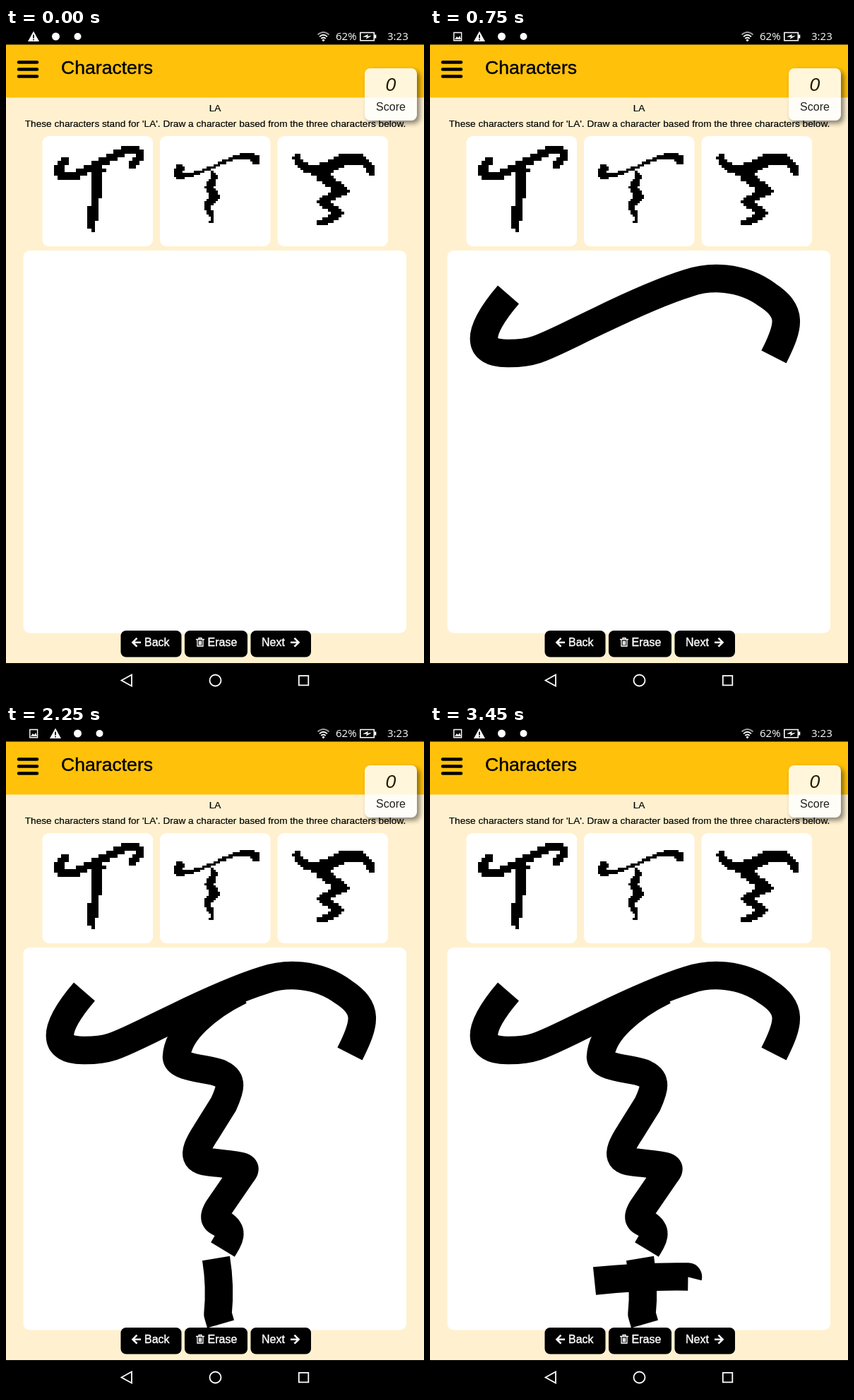
These frames come from a looping animation (592 px wide and 947 px high, 3.75 s). An HTML page:

```html
<!DOCTYPE html>
<html lang="en">
<head>
<meta charset="utf-8">
<title>Characters</title>
<style>
html, body { margin: 0; width: 100%; height: 100%; overflow: hidden; background: #fff1cf; }
svg { position: absolute; left: 0; top: 0; }
text { font: 13.67px "Liberation Sans", Arial, sans-serif; stroke: #000; stroke-width: .2; }
.title { font-size: 26.6px; stroke-width: .4; }
.status text { font: 15px "Open Sans", sans-serif; fill: #fff; stroke: none; }
.btn text { font-size: 16px; fill: #fff; stroke: #fff; stroke-width: .4; }
.mid { text-anchor: middle; }

.score {
  position: absolute; left: 508px; top: 57px; width: 74px; height: 74px;
  border-radius: 8px; background: #fff; opacity: .86;
  box-shadow: 4px 4px 7px rgba(0, 0, 0, .55);
  font: 16px/1 "Liberation Sans", Arial, sans-serif; text-align: center;
}
.score b { display: block; margin: 10px 0; font-size: 26.6px; font-weight: 400; font-style: italic; }

.brush { fill: none; stroke: #000; stroke-width: 39.5; stroke-linejoin: round; }
.step { animation: 3750ms step-end infinite; }
.s1 { animation-name: at1; }
.s2 { animation-name: at2; }
.s3 { animation-name: at3; }
.s4 { animation-name: at4; }
.notes { animation-name: shift; }
@keyframes at1 { 0% { opacity: 0 } 20%, 100% { opacity: 1 } }
@keyframes at2 { 0% { opacity: 0 } 40%, 100% { opacity: 1 } }
@keyframes at3 { 0% { opacity: 0 } 60%, 100% { opacity: 1 } }
@keyframes at4 { 0% { opacity: 0 } 80%, 100% { opacity: 1 } }
@keyframes shift { 0% { transform: none } 20%, 100% { transform: translateX(31px) } }
</style>
</head>
<body>
<svg width="592" height="947" viewBox="0 0 592 947">
  <rect width="592" height="947" fill="#fff1cf"/>
  <rect y="23" width="592" height="75.5" fill="#ffc10a"/>
  <rect width="592" height="23.5"/>

  <g class="status">
    <g class="step s1">
      <path d="M33.8 6.500h10.800v11.200h-10.800z" fill="none" stroke="#fff" stroke-width="1.4"/>
      <path d="M35 16l3-4 2 2 2-3 2 5z" fill="#fff"/>
    </g>
    <g class="step notes" fill="#fff">
      <path d="M39 4.5L47 19H31z"/>
      <path d="M39 9.5v5M39 15.8v1.8" stroke="#000" stroke-width="1.7"/>
      <circle cx="70.5" cy="12" r="5.5"/>
      <circle cx="101.5" cy="12" r="5"/>
    </g>
    <g fill="none" stroke="#fff" stroke-width="1.8">
      <path d="M441.5 9.5q8-7 16 0" stroke="#999"/>
      <path d="M444 12.3q5.5-5 11 0M446.3 15q3.200-3 6.400 0"/>
    </g>
    <circle cx="449.5" cy="17.3" r="1.6" fill="#fff"/>
    <text x="467" y="17">62%</text>
    <path d="M501.8 6.5h19.500v11.200h-19.500z" fill="none" stroke="#fff" stroke-width="1.6"/>
    <path d="M522 9.5h2.300v5h-2.300zM505 12.800l8-4-1 3 6-1-8 5 1-3z" fill="#fff"/>
    <text x="540" y="17">3:23</text>
  </g>

  <path d="M18 48.500h26m-26 10h26m-26 10h26" stroke="#000" stroke-width="4.6" stroke-linecap="round"/>
  <text class="title" x="78" y="65">Characters</text>
  <text class="mid" x="296" y="118">LA</text>
  <text class="mid" x="296.5" y="139.5">These characters stand for 'LA'. Draw a character based from the three characters below.</text>

  <g fill="#fff">
    <rect id="card" x="51.5" y="153" width="156.500" height="156" rx="9"/>
    <use href="#card" x="166.5"/>
    <use href="#card" x="333"/>
    <rect x="24.5" y="315" width="542.500" height="541.500" rx="9"/>
  </g>
  <path id="samples" shape-rendering="crispEdges"/>

  <g class="brush">
    <path class="step s1" d="M111 377.500C64 432 66 461 110 460.500C150 461 158 453 240 414C300 385 340 369 366 361C395 351 440 350 478 378C513 401 510 420 487 465.500"/>
    <path class="step s2" d="M332 376C285 399 243 435 241.500 470C243 487 290 486 304 493.500C322 502 318 515 308 537L283 577C260 612 270 617 290 619C342 625 343 624 333 637L300 685C290 702 300 702 309 708C322 718 317 726 307 742.500"/>
    <path class="step s3" d="M297.500 755Q304 795 300 834L304 848"/>
    <path class="step s4" d="M233 787Q300 780 365.500 781l-.1.4"/>
  </g>

  <g class="btn">
    <rect x="162.500" y="853" width="86" height="37.500" rx="7.500"/>
    <rect x="253" y="853" width="89" height="37.500" rx="7.500"/>
    <rect x="346.500" y="853" width="85.500" height="37.500" rx="7.500"/>
    <g fill="none" stroke="#fff">
      <path d="M191 869.700h-11m5.500-6l-6 6 6 6M403 869.700h11m-5.500-6l6 6-6 6" stroke-width="2.600"/>
      <path d="M269 865.500h12m-8 0v-2h4v2m-6 0v9.500h8v-9.500m-5.500 2v6m1.500 0v-6m1.500 0v6" stroke-width="1.300"/>
    </g>
    <text x="196" y="875">Back</text>
    <text x="285.500" y="875">Erase</text>
    <text x="362" y="875">Next</text>
  </g>

  <rect y="899" width="592" height="48"/>
  <g fill="none" stroke="#fff" stroke-width="1.800">
    <path d="M163.500 923.500l14.500-8v16z"/>
    <circle cx="296.500" cy="923.500" r="8"/>
    <path d="M414.800 916.800h13.500v13.500h-13.500z"/>
  </g>
</svg>
<div class="score"><b>0</b>Score</div>

<script>
// Each pen gives the radius at t = 0..1 along its stroke.
const samples = [
  { x: 67.5, y: 167, cell: 5.3, strokes: [
    ['M84 188C62 212 78 210 92 209S150 180 172 173Q190 168 188 182L179 192', t => 6],
    ['M131 202Q125 240 122 286', t => 8.5 - 4.5 * t * t]
  ] },
  { x: 231.5, y: 177, cell: 3.1, strokes: [
    ['M246 199Q236 211 252 209C285 205 305 186 335 182Q348 180 354 187', t => 2 + 4.5 * (1 - 2 * t) ** 2],
    ['M291 203L296 211 288 225 296 238 285 251 293 270M290 274h1', t => 2 + 4 * Math.sin(Math.PI * t)]
  ] },
  { x: 405, y: 178, cell: 3.9, strokes: [
    ['M411 183Q420 200 440 201C460 200 472 184 495 184Q510 185 519 206', t => 5 + 4 * Math.sin(Math.PI * t)],
    ['M448 210L478 230 448 245 472 263 446 276', t => 8 - 3 * t]
  ] }
];

function trace([d, pen]) {
  const path = document.createElementNS('http://www.w3.org/2000/svg', 'path');
  path.setAttribute('d', d);
  const length = path.getTotalLength(), dots = [];
  for (let s = 0; s <= length; s += .5) {
    const { x, y } = path.getPointAtLength(s);
    dots.push({ x, y, r: pen(s / length) });
  }
  return dots;
}

// Fill every grid cell whose centre lies under a stroke.
function pixelate({ x, y, cell, strokes }) {
  const dots = strokes.flatMap(trace);
  let d = '';
  for (let top = y; top < 290; top += cell)
    for (let left = x; left < x + 130; left += cell) {
      const cx = left + cell / 2, cy = top + cell / 2;
      if (dots.some(p => Math.hypot(p.x - cx, p.y - cy) <= p.r))
        d += `M${left} ${top}h${cell}v${cell}h${-cell}z`;
    }
  return d;
}

document.getElementById('samples').setAttribute('d', samples.map(pixelate).join(''));
</script>
</body>
</html>
```
